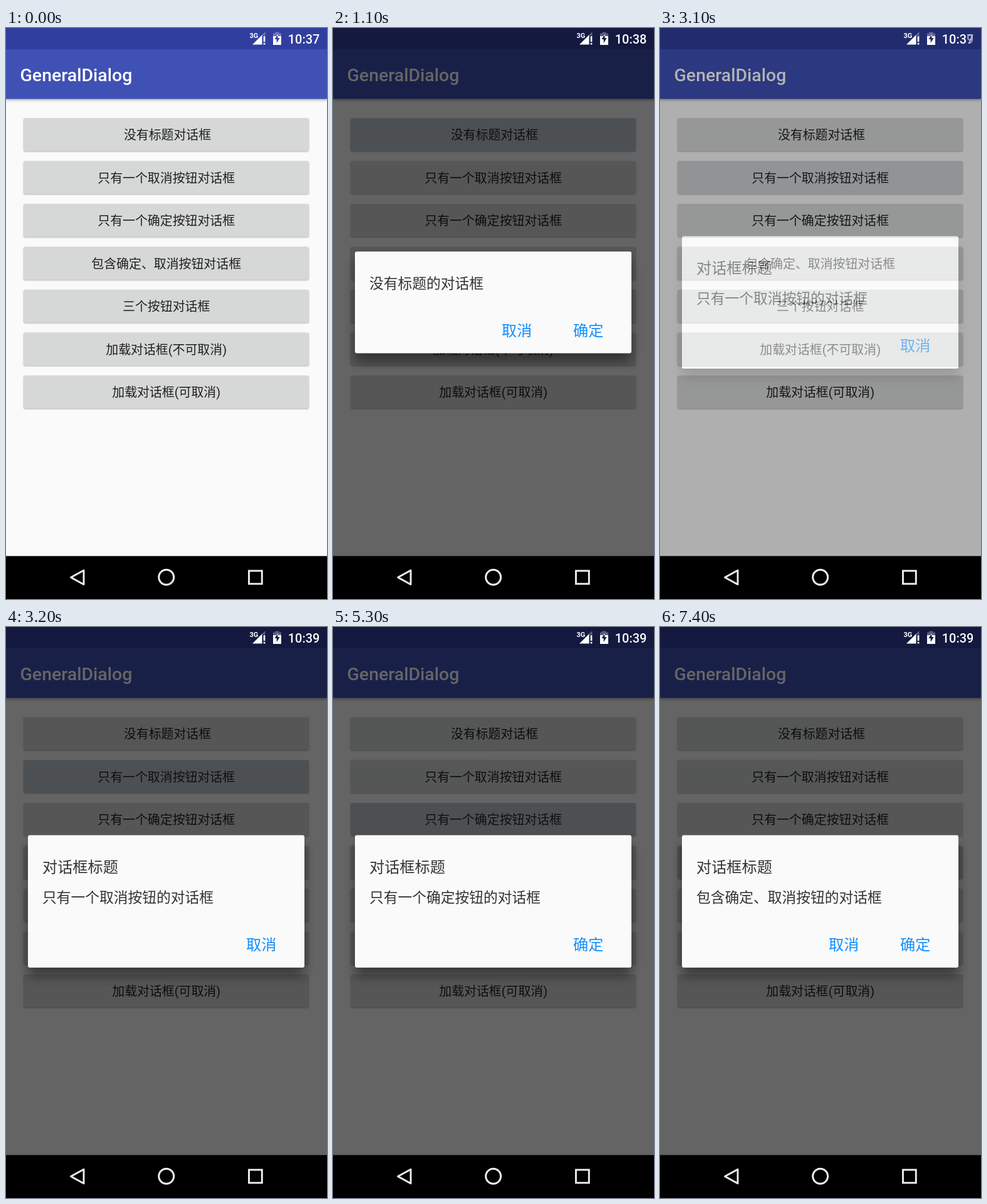
Recreate the animation shown at these times as an HTML page. Size 512 by 912 pixels, loop 8000 ms.

```html
<!DOCTYPE html>
<html lang="zh-CN">
<head>
<meta charset="utf-8">
<title>GeneralDialog</title>
<style>
  html, body { margin: 0; width: 100%; height: 100%; overflow: hidden; background: #fafafa; }
  svg { display: block; width: 512px; height: 912px; }
  text { font-family: Roboto, "Noto Sans CJK SC", "Noto Sans CJK", sans-serif; }

  .title { font-size: 28.44px; font-weight: 500; fill: #fff; }
  .bar { filter: drop-shadow(0 2px 2px rgba(0, 0, 0, .3)); }
  .btn rect { fill: #d6d7d7; filter: drop-shadow(0 1.5px 1px rgba(0, 0, 0, .3)); }
  .btn text { font-size: 19.9px; fill: #1f1f1f; text-anchor: middle; }

  .dim { fill: #000; fill-opacity: .6; }
  .press { fill: #10283c; fill-opacity: .13; }
  .card { fill: #fafafa; filter: drop-shadow(0 14px 9px rgba(0, 0, 0, .42)); }
  .head { font-size: 24.18px; fill: #333; }
  .msg { font-size: 22.76px; fill: #333; }
  .act { font-size: 24.18px; fill: #118eff; }
  .clock { font-size: 19.9px; font-weight: 500; fill: #fff; text-anchor: end; }
  .nav { fill: none; stroke: #eee; stroke-width: 2.9; }

  .layer { opacity: 0; animation: 8s step-end infinite; }
  #one { animation-name: one; }
  #two { animation-name: two; }
  #three { animation-name: three; }
  #four { animation-name: four; }
  #idle { animation: idle 8s step-end infinite; }

  /* each dialog appears half-blended for 100 ms, then stays for a second */
  @keyframes one { 0% { opacity: 0 } 12.5% { opacity: .5 } 13.75% { opacity: 1 } 26.25%, 100% { opacity: 0 } }
  @keyframes two { 0% { opacity: 0 } 38.75% { opacity: .5 } 40% { opacity: 1 } 52.5%, 100% { opacity: 0 } }
  @keyframes three { 0% { opacity: 0 } 65% { opacity: .5 } 66.25% { opacity: 1 } 78.75%, 100% { opacity: 0 } }
  @keyframes four { 0% { opacity: 0 } 91.25% { opacity: .5 } 92.5%, 100% { opacity: 1 } }
  @keyframes idle {
    0%, 26.25%, 52.5%, 78.75% { opacity: 1 }
    12.5%, 38.75%, 65%, 91.25% { opacity: .5 }
    13.75%, 40%, 66.25%, 92.5%, 100% { opacity: 0 }
  }
</style>
</head>
<body>
<svg viewBox="0 0 512 912">
  <defs>
    <rect id="box" x="28" y="144" width="455" height="52.5" rx="3"/>
    <g id="tall">
      <rect class="card" x="35" y="332.5" width="441" height="211.5" rx="3"/>
      <text class="head" x="58" y="392.3">对话框标题</text>
    </g>
  </defs>

  <rect width="512" height="912" fill="#fafafa"/>
  <rect class="bar" y="34" width="512" height="79.3" fill="#3f51b5"/>
  <rect width="512" height="34" fill="#303f9f"/>
  <text class="title" x="22.5" y="84.6">GeneralDialog</text>

  <g class="btn"><rect x="28" y="144" width="455" height="52.5" rx="3"/><text x="257.5" y="178.4">没有标题对话框</text></g>
  <g class="btn" transform="translate(0 68.5)"><rect x="28" y="144" width="455" height="52.5" rx="3"/><text x="255.7" y="178.4">只有一个取消按钮对话框</text></g>
  <g class="btn" transform="translate(0 137)"><rect x="28" y="144" width="455" height="52.5" rx="3"/><text x="255.7" y="178.4">只有一个确定按钮对话框</text></g>
  <g class="btn" transform="translate(0 205.5)"><rect x="28" y="144" width="455" height="52.5" rx="3"/><text x="255.7" y="178.4">包含确定、取消按钮对话框</text></g>
  <g class="btn" transform="translate(0 274)"><rect x="28" y="144" width="455" height="52.5" rx="3"/><text x="255.7" y="178.4">三个按钮对话框</text></g>
  <g class="btn" transform="translate(0 342.5)"><rect x="28" y="144" width="455" height="52.5" rx="3"/><text x="255.7" y="178.4">加载对话框(不可取消)</text></g>
  <g class="btn" transform="translate(0 411)"><rect x="28" y="144" width="455" height="52.5" rx="3"/><text x="255.7" y="178.4">加载对话框(可取消)</text></g>

  <g id="one" class="layer">
    <rect class="dim" width="512" height="844"/>
    <use href="#box" class="press"/>
    <rect class="card" x="35" y="357" width="441" height="162.5" rx="3"/>
    <text class="msg" x="58" y="415.7">没有标题的对话框</text>
    <text class="act" x="269" y="491.5">取消</text>
    <text class="act" x="383" y="491.5">确定</text>
    <text class="clock" x="500.3" y="24.5">8</text>
  </g>

  <g id="two" class="layer">
    <rect class="dim" width="512" height="844"/>
    <use href="#box" class="press" y="68.5"/>
    <use href="#tall"/>
    <text class="msg" x="58" y="440.4">只有一个取消按钮的对话框</text>
    <text class="act" x="383" y="516.2">取消</text>
    <text class="clock" x="500.3" y="24.5">9</text>
  </g>

  <g id="three" class="layer">
    <rect class="dim" width="512" height="844"/>
    <use href="#box" class="press" y="137"/>
    <use href="#tall"/>
    <text class="msg" x="58" y="440.4">只有一个确定按钮的对话框</text>
    <text class="act" x="383" y="516.2">确定</text>
    <text class="clock" x="500.3" y="24.5">9</text>
  </g>

  <g id="four" class="layer">
    <rect class="dim" width="512" height="844"/>
    <use href="#box" class="press" y="205.5"/>
    <use href="#tall"/>
    <text class="msg" x="58" y="440.4">包含确定、取消按钮的对话框</text>
    <text class="act" x="269" y="516.2">取消</text>
    <text class="act" x="383" y="516.2">确定</text>
    <text class="clock" x="500.3" y="24.5">9</text>
  </g>

  <!-- status icons stay bright above the dimming -->
  <g fill="#fff">
    <text x="388.5" y="15.5" font-size="11" font-weight="700" textLength="">3G</text>
    <path d="M404 15.5L413.5 6V12H408.5V15.5Z" opacity=".3"/>
    <path d="M393 26.5L408.5 11V26.5Z"/>
    <path d="M410.7 13H413.4V22H410.7ZM410.7 23.8H413.4V26.5H410.7Z"/>
    <path d="M426 13V8.5H429.5V6.5H435.5V8.5H439V13Z" opacity=".3"/>
    <path fill-rule="evenodd" d="M426 13H439V27H426ZM433.5 10L428.5 18H431.7V24L436.7 16H433.5Z"/>
  </g>
  <text class="clock" x="489" y="24.5">10:3</text>
  <text id="idle" class="clock" x="500.3" y="24.5">7</text>

  <rect y="843.4" width="512" height="68.6" fill="#000"/>
  <g class="nav">
    <path d="M103.5 877.5L124 866.3V888.7Z" stroke-linejoin="round"/>
    <circle cx="255.7" cy="877.3" r="12"/>
    <rect x="387.5" y="867" width="20.8" height="20.8"/>
  </g>
</svg>
</body>
</html>
```
